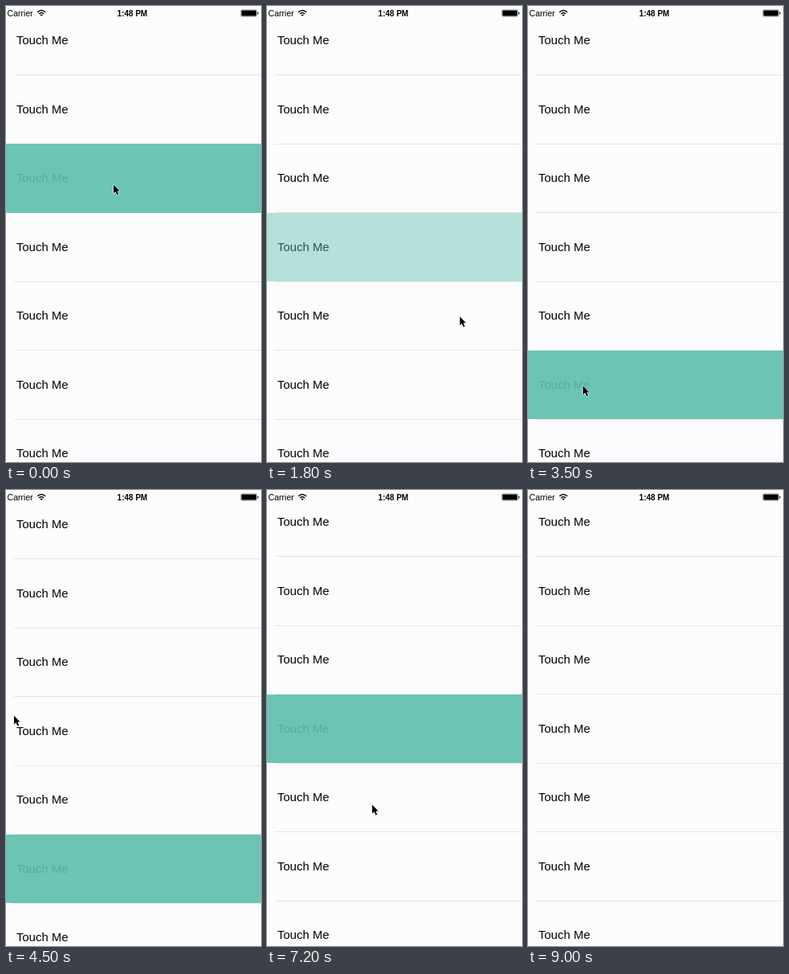
An HTML page for the animation above (9100 ms loop, 320 by 573 pixels).

```html
<!DOCTYPE html>
<html lang="en">
<head>
<meta charset="utf-8">
<title>Touch list</title>
<style>
  html, body { margin: 0; width: 100%; height: 100%; overflow: hidden; background: #fcfcfe; }
  svg { display: block; width: 100%; height: 100%; }
  text { font-family: "Liberation Sans", Arial, sans-serif; white-space: pre; }
</style>
</head>
<body>
<svg viewBox="0 0 320 573">
  <rect width="320" height="573" fill="#fcfcfe"/>
  <g id="list" font-size="15"></g>
  <rect id="bar" x="316" width="2.5" height="127" rx="1.2" fill="#7c7c74"/>
  <text x="1.5" y="12.5" font-size="10.6">Carrier</text>
  <g fill="none" stroke="#000" stroke-width="1.5">
    <path d="M39.4 7.8Q44.4 3.2 49.4 7.8"/>
    <path d="M41.4 9.9Q44.4 7.2 47.4 9.9"/>
  </g>
  <path d="M42.7 11.1Q44.4 9.8 46.1 11.1L44.4 13Z"/>
  <text x="158.5" y="12.5" font-size="10" font-weight="bold" text-anchor="middle">1:48 PM</text>
  <rect x="294.75" y="4.75" width="20" height="8.5" rx="1.5" fill="none" stroke="#555" stroke-width=".5"/>
  <rect x="295.5" y="5.5" width="18.5" height="7" rx=".8"/>
  <rect x="315.4" y="7.5" width="1.2" height="3" rx=".6"/>
  <path id="cursor" d="M0 0V13L3 10.3 5.2 15.3 7.4 14.3 5.2 9.5H9Z"
        stroke="#fff" stroke-width="1.4" paint-order="stroke" stroke-linejoin="round"/>
</svg>
<script>
const LOOP = 9100, STEP = 100, PITCH = 86.5, ROWS = 8;
const PRESS = 1100, FADE_IN = 200, FADE_OUT = 400;
const DRAG = 5400, DRAG_TIME = 800, PULL = 19, REST = 3;
const BASE = [252, 252, 254], TEAL = [108, 197, 180];
const INK = [0, 0, 0], FADED = [95, 163, 170];

// [row, start]
const presses = [[2, -400], [3, 900], [4, 2300], [5, 3200], [5, 4100], [3, 6800], [4, 7700]];

// [time, x, y]
const stops = [
  [0, 134, 224], [1300, 156, 324], [2000, 262, 406], [2300, 26, 407], [2800, 26, 407],
  [3600, 70, 480], [4500, 9, 283], [DRAG, 152, 170], [DRAG + DRAG_TIME, 152, 167],
  [6400, 150, 544], [7200, 131, 395], [7700, 131, 416]
];

const $ = id => document.getElementById(id);
const ramp = (t, start, time) => Math.max(0, Math.min(1, (t - start) / time));
const ease = k => k * k * (3 - 2 * k);
const mix = (a, b, k) => a + (b - a) * k;
const rgb = (a, b, k) => `rgb(${a.map((v, i) => Math.round(mix(v, b[i], k)))})`;

function add(parent, tag, attrs) {
  const el = document.createElementNS("http://www.w3.org/2000/svg", tag);
  for (const key in attrs) el.setAttribute(key, attrs[key]);
  return parent.appendChild(el);
}

const rows = Array.from({ length: ROWS }, (_, i) => {
  const y = i * PITCH, crisp = { "shape-rendering": "crispEdges" };
  add($("list"), "rect", {
    x: 10, y: y + PITCH - .5, width: 310, height: 1, fill: "#e6e6dc", ...crisp
  });
  const fill = add($("list"), "rect", { x: 0, y, width: 320, height: PITCH, ...crisp });
  const label = add($("list"), "text", { x: 13, y: y + 48 });
  label.textContent = "Touch Me";
  return { fill, label };
});

function glow(row, t) {
  const levels = presses.filter(p => p[0] === row).map(([, start]) =>
    Math.min(ramp(t, start, FADE_IN), 1 - ramp(t, start + PRESS - FADE_OUT, FADE_OUT)));
  return Math.max(0, ...levels);
}

function pointer(t) {
  const next = stops.findIndex(s => s[0] > t);
  if (next < 0) return stops[stops.length - 1].slice(1);
  const [t0, x0, y0] = stops[next - 1], [t1, x1, y1] = stops[next];
  const k = ease(ramp(t, t0, t1 - t0));
  return [mix(x0, x1, k), mix(y0, y1, k)];
}

function draw(t) {
  rows.forEach(({ fill, label }, i) => {
    const k = glow(i, t);
    fill.setAttribute("visibility", k ? "visible" : "hidden");
    fill.setAttribute("fill", rgb(BASE, TEAL, k));
    label.setAttribute("fill", rgb(INK, FADED, k));
  });

  const drag = ramp(t, DRAG, DRAG_TIME);
  const pull = PULL * Math.sin(Math.PI * drag);
  const scroll = pull + REST * ease(drag);
  const [x, y] = pointer(t);
  $("list").setAttribute("transform", `translate(0 ${-scroll})`);
  $("bar").setAttribute("y", 22.5 + scroll * .23);
  $("bar").setAttribute("opacity", Math.min(ramp(t, DRAG - 100, 200), 1 - ramp(t, 6200, 300)));
  $("cursor").setAttribute("transform", `translate(${x + 1} ${y - pull + .5}) scale(.85)`);
  $("cursor").setAttribute("visibility", t < 8800 ? "visible" : "hidden");
}

const begin = performance.now();
function tick() {
  const t = (performance.now() - begin) % LOOP;
  draw(Math.floor(t / STEP) * STEP);
  requestAnimationFrame(tick);
}
tick();
</script>
</body>
</html>
```
